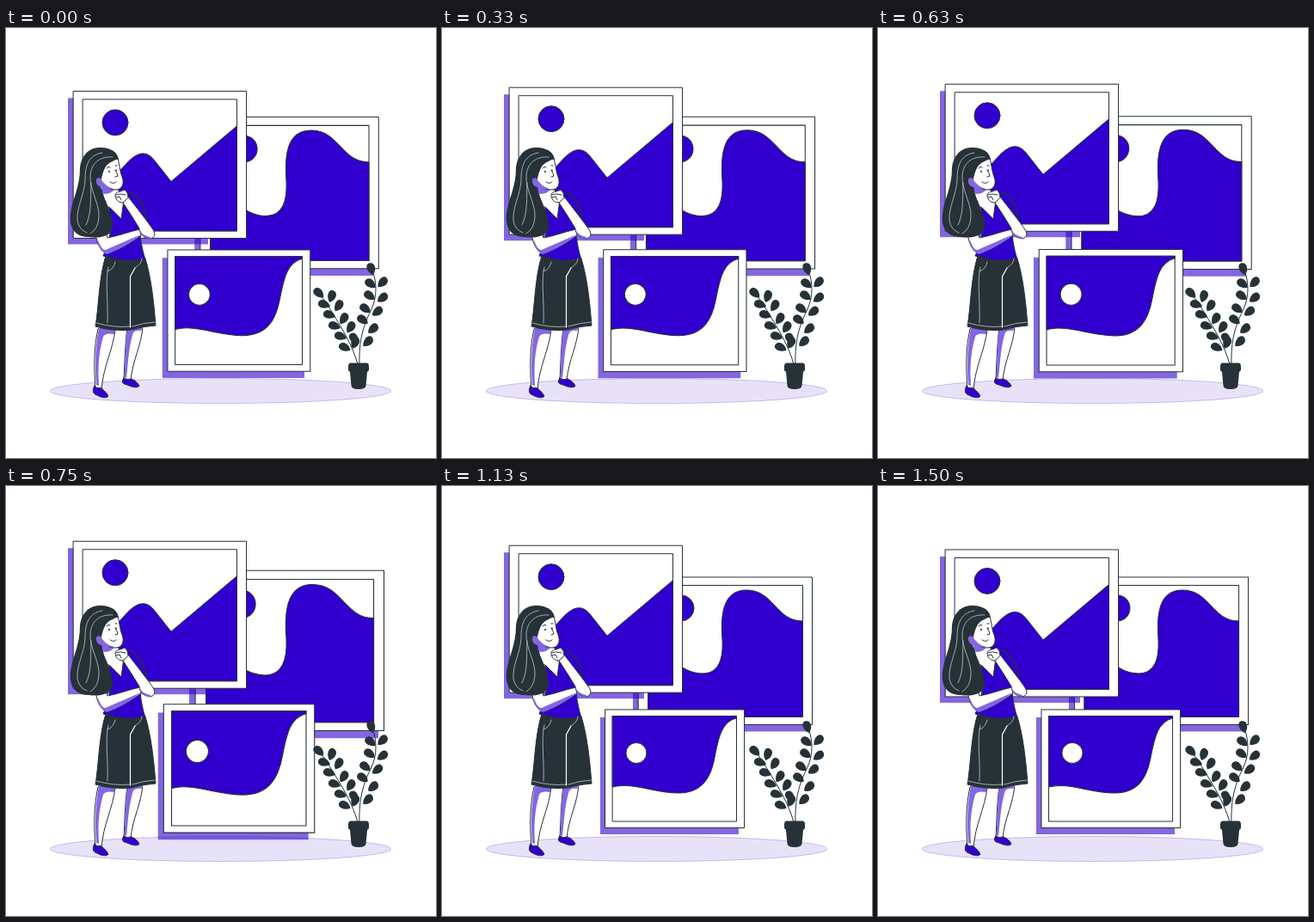
An HTML page for the animation above (1540 ms loop, 500 px wide and 500 px high).

```html
<!DOCTYPE html>
<html lang="en">
<head>
<meta charset="utf-8">
<title>Gallery</title>
<style>
  html, body { margin: 0; width: 100%; height: 100%; overflow: hidden; background: #fff; }
  svg { display: block; width: 100vw; height: 100vh; }
  .blue { fill: #3100ce; }
  .shade { fill: #3100ce; fill-opacity: .6; }
  .tint { fill: #8466e2; }
  .dark { fill: #263238; }
  .white { fill: #fff; }
  .line { stroke: #263238; stroke-linecap: round; stroke-linejoin: round; }
  .bare { fill: none; }
  .light { fill: none; stroke: #c3c8ca; stroke-width: .8; stroke-linecap: round; }
</style>
</head>
<body>
<svg viewBox="0 0 500 500">
  <ellipse cx="249.500" cy="422" rx="198" ry="14.500" fill="#e8e2f9" stroke="#8466e2" stroke-width=".4"/>

  <g id="right">
    <path class="shade" d="M222 114H424.500V285.500H222Z"/>
    <path class="white line" d="M228.500 106H430.500V277.500H228.500Z"/>
    <path class="white line" d="M240 115.500H419.500V268.500H240Z"/>
    <circle class="blue line" cx="278" cy="142" r="15"/>
    <path class="blue line" d="M240 180C260 190 275 218 303 218C322 218 327 201 326 179C324 153 325 121 354 121C386 121 388 157 419.500 157V268.500H240Z"/>
  </g>

  <g id="left">
    <path class="shade" d="M72 82H235V252H72Z"/>
    <path class="white line" d="M78.500 74H279.500V245H78.500Z"/>
    <path class="white line" d="M89.500 83.500H268.500V236.500H89.500Z"/>
    <circle class="blue line" cx="127" cy="110.500" r="15"/>
    <path class="blue line" d="M89.500 212L142 156C154 144 164 143 173 155L192 179L268.500 114.500V236.500H89.500Z"/>
  </g>

  <g id="front">
    <path class="shade" d="M184 269H345V405H184Z"/>
    <path class="white line" d="M190 260H351.500V397.500H190Z"/>
    <path class="white line" d="M198.500 267.500H342.500V390H198.500Z"/>
    <path class="blue line" d="M198.500 350C222 344 246 357 275 357C304 357 313 337 317 316C322 290 326 274 342.500 270V267.500H198.500Z"/>
    <circle class="white line" cx="226" cy="310.500" r="12"/>
  </g>

  <g id="plant" class="dark">
    <path class="line bare" d="M411 392C410 362 416 345 425 327C432 311 431 296 426 281M409 391C403 369 391 350 380 332Q372 318 364 308"/>
    <path d="M400 389.500H420Q422 390 422 393V398L420 400L418.500 416Q418 420 410 420Q402 420 401.500 416L400 400L398 398V393Q398 390 400 389.500Z"/>
  </g>

  <g id="woman">
    <path class="white line" d="M107 350C102 372 102 394 104 419L111 421C113 393 124 376 127 351Z"/>
    <path class="tint" d="M108 349H127L126 356Q115 354 113 359C107 380 107 397 108 416L105 415C103 390 104 370 108 349Z"/>
    <path class="white line" d="M141 348C138 374 138 390 137 409L145 410C147 386 158 369 159 346Z"/>
    <path class="tint" d="M141 348L159 346L157 352Q148 351 147 357C142 376 142 392 140 407L138 406C138 382 139 366 141 348Z"/>
    <path class="blue line" d="M103 416C100 421 101 426 106 427C111 430 117 431 119 428C117 424 112 419 109 418Q106 420 103 416Z"/>
    <path class="blue line" d="M137 407C134 411 135 414 141 415C147 418 154 419 155 416C153 412 148 408 145 408Q141 410 137 407Z"/>

    <path class="white line" d="M111 176L113 196L119 210L135 224L139 196L130 188Z"/>
    <path class="tint" d="M111 181L126 188Q119 195 112 192Z"/>
    <path class="blue line" d="M120 208L134 222L138 192C150 189 157 202 164 224L156 240Q158 258 162 269Q136 274 113 265Q122 246 122 226Z"/>
    <path class="dark line" d="M116 265Q138 274 162 268C169 291 172 320 174 346Q158 347 146 351Q124 353 104 347C108 324 108 289 116 265Z"/>
    <path class="light" d="M105 343Q126 349 145 347M147 347Q159 343 173 342M118 343C119 318 115 292 119 278M127 272Q125 281 118 283M158 268Q158 274 150 279"/>
    <path class="light" style="stroke:#fff;stroke-width:1.200" d="M150 279L144.500 289V348"/>

    <path class="white line" d="M104 235C104 247 109 259 117 263C131 258 147 249 157 241L156 234C142 237 130 242 118 244L114 232Z"/>
    <path class="tint" d="M107 246C110 256 114 260 118 257C132 251 145 245 157 240C146 249 132 258 117 263C110 260 107 253 107 246Z"/>
    <path class="white line" d="M136 203L142 196C150 207 165 225 172 236Q175 243 168 245C159 244 155 239 155 233Q146 218 136 203Z"/>
    <path class="tint" d="M155 233Q157 241 168 243L167 245Q156 243 155 233Z"/>

    <path class="dark" d="M131 154C130 143 119 138 108 139C94 140 87 151 86 163C86 185 77 199 75 216C73 233 81 243 96 243C110 245 124 242 124 230C124 214 113 199 110 184L118 160Z"/>
    <path class="white line" d="M110 179C111 171 114 158 123 153L130 152C132 157 132 166 135 173C138 181 135 188 128 188C121 188 114 186 110 179Z"/>
    <path class="tint" d="M110 175C104 172 103 180 108 184Q116 188 125 187Q115 184 110 175Z"/>
    <path class="dark" d="M110 174C112 168 115 158 124 155Q131 151 131 154Q130 143 119 141L106 157Z"/>
    <path class="line bare" d="M127 165Q130 170 130 172L127 173M121 179Q125 182 128 179M117 163Q119 160 121 162M127 160L129 160"/>
    <circle class="dark" cx="120" cy="167" r="1.100"/>
    <circle class="dark" cx="128" cy="165.500" r=".9"/>
    <path class="light" d="M124 150C109 149 99 157 98 172C97 188 109 204 108 220Q107 234 98 239M112 145C94 148 92 163 92 177C91 195 82 207 83 224Q85 235 94 238M99 180C98 198 100 215 93 229"/>

    <path class="white line" d="M136 203C130 203 127 199 127 194C128 190 131 191 133 190L138 188Q142 191 142 197Z"/>
    <path class="line bare" d="M128 194L132 193M128 197L132 196L134 200M133 193L139 194"/>
    <path class="line bare" stroke-dasharray="4 2" d="M146 191C155 194 159 206 164 219"/>
  </g>
</svg>
<script>
const LOOP = 1540, START = 40;
const byId = id => document.getElementById(id);
const [left, right, front, plant] = ["left", "right", "front", "plant"].map(byId);

// Leaves: x, y, angle
const leaves = [
  [425, 280, -12], [424, 297, -48], [438, 296, 48], [423, 311, -50], [438, 314, 55],
  [418, 326, -50], [432, 330, 55], [415, 339, -50], [427, 350, 52], [421, 365, 50], [405, 361, -25],
  [364, 308, -42], [379, 312, 22], [370, 321, -68], [387, 323, 35], [376, 333, -68],
  [393, 338, 35], [382, 346, -68], [401, 348, 35], [389, 358, -68], [394, 371, -60], [406, 366, 25]
];
for (const [x, y, angle] of leaves) {
  const leaf = document.createElementNS("http://www.w3.org/2000/svg", "path");
  leaf.setAttribute("d", "M0 7.500C-7 2 -6.500 -7 -1 -7C5.500 -7 6.500 2 0 7.500Z");
  leaf.setAttribute("transform", `translate(${x} ${y}) rotate(${angle})`);
  plant.append(leaf);
}

// Two beats per loop, then rest
const heartbeat = p => Math.max(0,
  Math.min(p / .1, (.3 - p) / .2),
  Math.min((p - .4) / .1, (.6 - p) / .1));

const scaleAbout = (el, x, y, s) =>
  el.setAttribute("transform", `translate(${x} ${y}) scale(${s}) translate(${-x} ${-y})`);

function draw(time) {
  const p = (time + START) % LOOP / LOOP;
  const size = 1 + .1 * heartbeat(p);
  const lift = 10 * (1 - Math.abs(1 - 2 * p));
  left.setAttribute("transform", `translate(0 ${-lift})`);
  scaleAbout(right, 326.3, 195.75, size);
  scaleAbout(front, 267.75, 332.5, size);
}

const begin = performance.now();
function tick() {
  draw(performance.now() - begin);
  requestAnimationFrame(tick);
}
tick();
</script>
</body>
</html>
```
